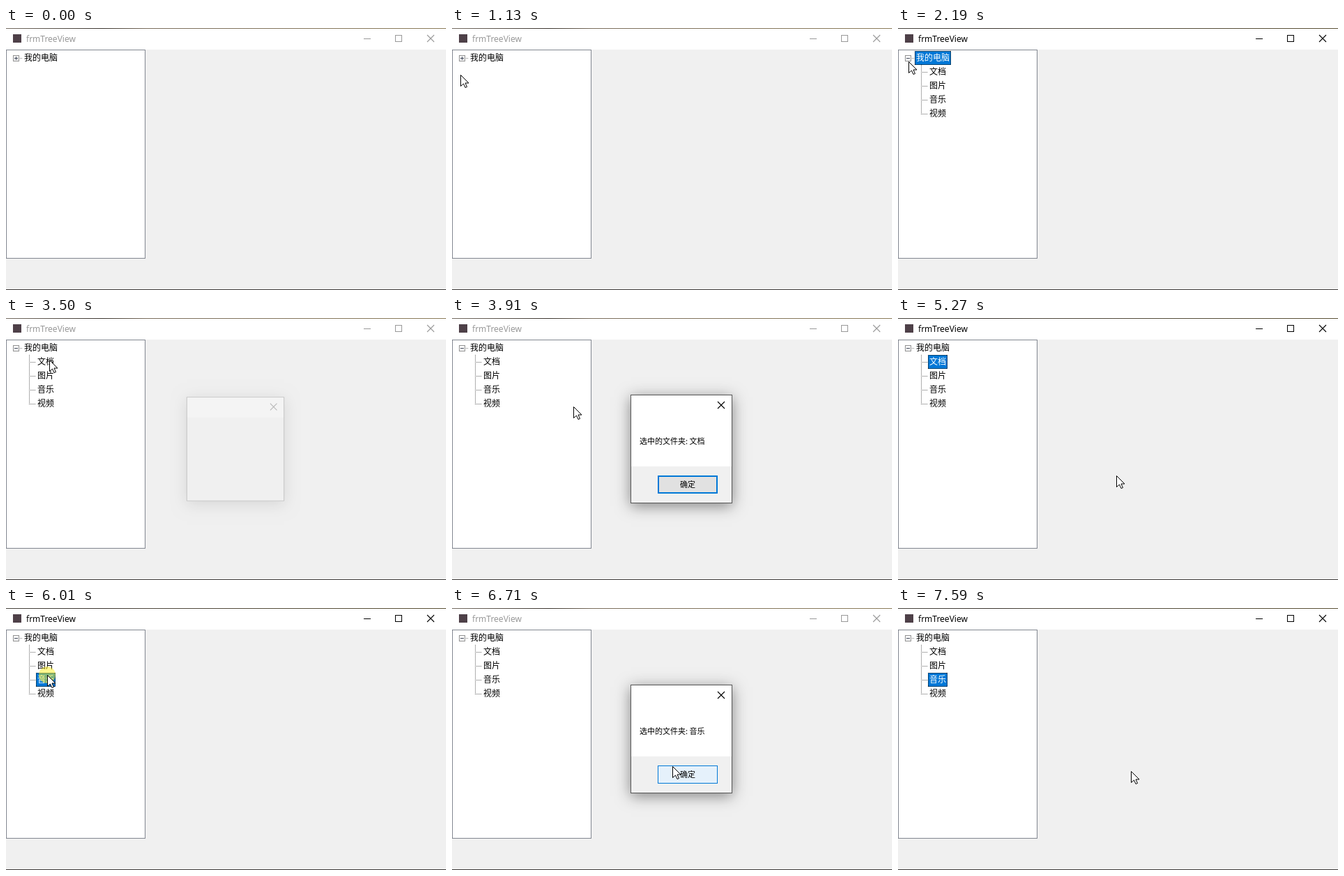
Animation of 631 by 376 pixels, one loop 8000 ms. Source, as an HTML page with a canvas:

```html
<!DOCTYPE html>
<html lang="zh-CN">
<head>
<meta charset="utf-8">
<title>frmTreeView</title>
<style>
  html, body { margin: 0; width: 100%; height: 100%; overflow: hidden; background: #f0f0f0; }
  canvas { display: block; width: 631px; height: 376px; }
</style>
</head>
<body>
<canvas id="stage" width="631" height="376"></canvas>
<script>
const ctx = document.getElementById('stage').getContext('2d');
const LOOP = 8000;
const TICK = 67;
const BLUE = '#0078d7';
const CJK = '"Noto Sans CJK SC", "Noto Sans CJK", sans-serif';
const FOLDERS = ['文档', '图片', '音乐', '视频'];

// Cursor path: time, x, y
const PATH = [
  [500, 30, 329], [780, 27, 235], [1060, 11, 85], [1200, 14, 48],
  [2120, 14, 47], [2190, 15, 48], [2560, 56, 67], [2820, 62, 60],
  [3640, 62, 60], [4250, 316, 212], [4600, 346, 243],
  [5180, 346, 243], [5560, 160, 146], [5870, 59, 96],
  [6270, 59, 96], [6350, 114, 122], [6710, 316, 227], [6990, 334, 234]
];
const CLICKS = [[1330, 1600], [3290, 3500], [4800, 4930], [5940, 6140], [7260, 7400]];
const DIALOGS = [
  { open: 3500, close: 4930, name: '文档' },
  { open: 6140, close: 7400, name: '音乐' }
];
const OPEN_MS = 280;
const CLOSE_MS = 190;

const within = (t, a, b) => t >= a && t < b;
const stepped = ms => Math.floor(ms / TICK) * TICK;

function rect(x, y, w, h, color) {
  ctx.fillStyle = color;
  ctx.fillRect(x, y, w, h);
}

function frame(x, y, w, h, color, width = 1) {
  ctx.strokeStyle = color;
  ctx.lineWidth = width;
  ctx.strokeRect(x + width / 2, y + width / 2, w - width, h - width);
}

function text(str, x, y, color, font) {
  ctx.font = font;
  ctx.fillStyle = color;
  ctx.fillText(str, x, y);
}

function dots(x, y, w, h, color) {
  for (let i = 0; i < Math.max(w, h); i += 2) {
    rect(w > h ? x + i : x, w > h ? y : y + i, 1, 1, color);
  }
}

function cross(x, y, color) {
  ctx.strokeStyle = color;
  ctx.lineWidth = 1.1;
  ctx.beginPath();
  ctx.moveTo(x, y);
  ctx.lineTo(x + 10, y + 10);
  ctx.moveTo(x + 10, y);
  ctx.lineTo(x, y + 10);
  ctx.stroke();
}

function cursorAt(t) {
  if (t < PATH[0][0]) return null;
  let i = 0;
  while (i < PATH.length - 1 && t >= PATH[i + 1][0]) i++;
  const a = PATH[i];
  const b = PATH[i + 1] || a;
  const k = b === a ? 0 : stepped(t - a[0]) / (b[0] - a[0]);
  return {
    x: Math.round(a[1] + (b[1] - a[1]) * k),
    y: Math.round(a[2] + (b[2] - a[2]) * k)
  };
}

function drawWindow(active) {
  const ink = active ? '#000' : '#999';
  rect(0, 0, 631, 376, '#f0f0f0');
  rect(0, 1, 631, 30, '#fff');

  const edge = ctx.createLinearGradient(0, 0, 631, 0);
  edge.addColorStop(0, active ? '#45413a' : '#746b60');
  edge.addColorStop(0.22, '#3a342e');
  edge.addColorStop(0.32, active ? '#4d463b' : '#7a6d5c');
  edge.addColorStop(1, active ? '#5a5034' : '#8b7b58');
  rect(0, 0, 631, 1, edge);
  rect(0, 375, 631, 1, '#3c3a38');

  rect(10, 9, 12, 12, '#4e4048');
  text('frmTreeView', 29, 20, ink, '12px "Noto Sans", sans-serif');
  rect(513, 15, 10, 1, ink);
  frame(558, 10, 10, 10, ink);
  cross(604, 10, ink);
}

function drawLabel(str, x, y, selected) {
  if (selected) {
    const w = str.length * 12 + 4;
    rect(x - 2, y - 10, w, 20, BLUE);
    for (const dy of [-10, 9]) dots(x - 2, y + dy, w, 1, '#101010');
    for (const dx of [-2, w - 3]) dots(x + dx, y - 10, 1, 20, '#101010');
  }
  text(str, x, y + 4, selected ? '#fff' : '#000', '12px ' + CJK);
}

function drawTree(expanded, selected) {
  rect(0, 31, 200, 300, '#fff');
  frame(0, 31, 200, 300, '#828790');

  frame(10, 39, 9, 9, '#919191');
  rect(12, 43, 5, 1, '#404858');
  if (!expanded) rect(14, 41, 1, 5, '#404858');
  dots(20, 43, 4, 1, '#808080');
  drawLabel('我的电脑', 26, 43, selected === '我的电脑');

  if (!expanded) return;
  dots(33, 53, 1, 71, '#606060');
  FOLDERS.forEach((name, i) => {
    const y = 63 + i * 20;
    dots(33, y, 10, 1, '#606060');
    drawLabel(name, 45, y, selected === name);
  });
}

function drawButton(hot, pressed) {
  rect(295, 226, 86, 26, pressed ? '#cce4f7' : hot ? '#e5f1fb' : '#e1e1e1');
  frame(295, 226, 86, 26, pressed ? '#005499' : BLUE, hot ? 1 : 2);
  text('确定', 327, 243, '#000', '11px ' + CJK);
}

function drawShadow() {
  ctx.save();
  ctx.beginPath();
  ctx.rect(200, 60, 260, 270);
  ctx.rect(256, 110, 146, 156);
  ctx.clip('evenodd');
  ctx.shadowColor = 'rgba(0,0,0,0.45)';
  ctx.shadowBlur = 20;
  ctx.shadowOffsetY = 4;
  rect(256, 110, 146, 156, '#555');
  ctx.restore();
}

function drawDialog(t, dialog, cursor, pressed) {
  const age = stepped(t - dialog.open);
  const left = stepped(t - dialog.close);
  const grow = Math.min(1, age / OPEN_MS);
  const eased = 1 - (1 - grow) ** 2;
  const fade = left < 0 ? 0 : Math.min(1, (left + TICK) / (CLOSE_MS + TICK));
  const scale = 0.96 + 0.04 * eased - 0.06 * fade;
  const hot = cursor && cursor.x >= 295 && cursor.x < 381 && cursor.y >= 226 && cursor.y < 252;
  const painted = age >= TICK;

  ctx.save();
  ctx.globalAlpha = (0.25 + 0.75 * eased) * (1 - fade);
  ctx.translate(329, 188);
  ctx.scale(scale, scale);
  ctx.translate(-329, -188);
  drawShadow();
  rect(257, 111, 144, painted ? 102 : 30, '#fff');
  rect(257, painted ? 213 : 141, 144, painted ? 52 : 124, '#f0f0f0');
  frame(256, 110, 146, 156, '#555');
  cross(381, 120, '#000');
  if (painted) {
    text('选中的文件夹: ' + dialog.name, 269, 181, '#000', '11px ' + CJK);
    drawButton(hot, pressed);
  }
  ctx.restore();
}

function drawCursor({ x, y }, clicking) {
  if (clicking) {
    ctx.fillStyle = 'rgba(255,240,30,0.5)';
    ctx.beginPath();
    ctx.arc(x, y, 12, 0, Math.PI * 2);
    ctx.fill();
  }
  const arrow = [[0, 0], [0, 16], [4, 12.5], [6.5, 18], [9, 17], [6.5, 11.5], [11.5, 11.5]];
  ctx.beginPath();
  arrow.forEach(([dx, dy]) => ctx.lineTo(x + 0.5 + dx, y + 0.5 + dy));
  ctx.closePath();
  ctx.fillStyle = '#fff';
  ctx.fill();
  ctx.strokeStyle = '#000';
  ctx.lineWidth = 1;
  ctx.stroke();
}

function draw(t) {
  const cursor = cursorAt(t);
  const clicking = CLICKS.some(([a, b]) => within(t, a, b));
  const active = t >= 1330 && !DIALOGS.some(d => within(t, d.open, d.close));
  const selected = t < 3360 ? '我的电脑' : t < 6010 ? '文档' : '音乐';

  drawWindow(active);
  drawTree(t >= 1400, active ? selected : null);
  const dialog = DIALOGS.find(d => within(t, d.open, d.close + CLOSE_MS));
  if (dialog) drawDialog(t, dialog, cursor, clicking);
  if (cursor) drawCursor(cursor, clicking);
}

const start = performance.now();
function tick() {
  draw((performance.now() - start) % LOOP);
  requestAnimationFrame(tick);
}
tick();
</script>
</body>
</html>
```
